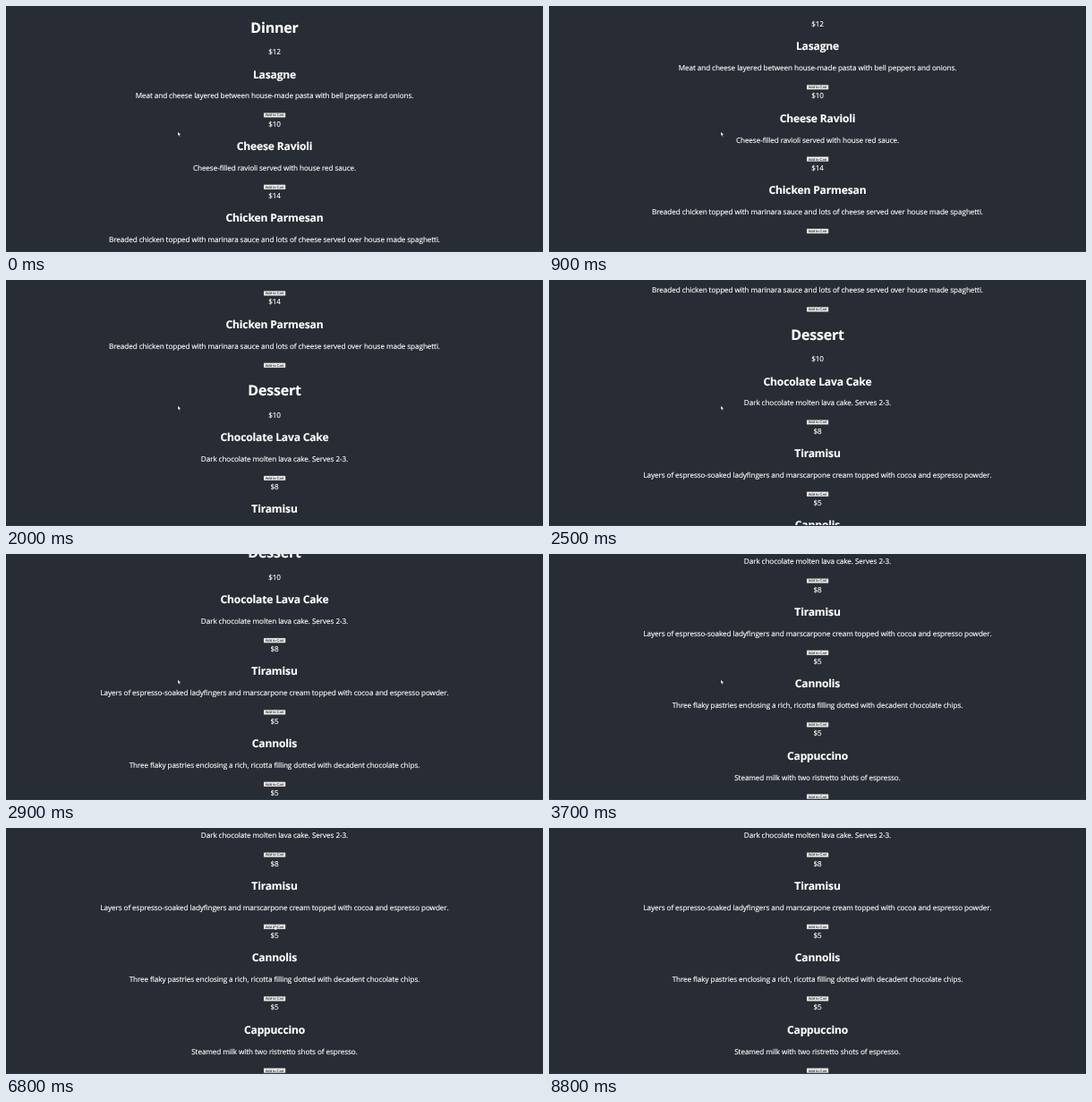
These frames come from a looping animation (600 by 275 pixels, 8.9 s). An HTML page:

```html
<!DOCTYPE html>
<html lang="en">
<head>
<meta charset="utf-8">
<title>Menu</title>
<style>
  html, body { margin: 0; width: 100%; height: 100%; overflow: hidden; background: #282c34; }
  svg { display: block; width: 100%; height: 100%; }
  text {
    fill: #fff; stroke: #fff; stroke-width: .14;
    text-anchor: middle; text-rendering: geometricPrecision;
    font: 8.2px "Open Sans", "Noto Sans", sans-serif; letter-spacing: -.1px;
  }
  .title { font-size: 16px; font-weight: 700; letter-spacing: -.2px; }
  .dish { font-size: 12.1px; font-weight: 700; letter-spacing: -.18px; }
  .label { font: 4.1px "Liberation Sans", Arial, sans-serif; fill: #000; stroke: none; letter-spacing: 0; }
  .button { fill: #efefef; stroke: #767676; stroke-width: .3; }
  .pointer { fill: #fff; stroke: #111; stroke-width: .35; stroke-linejoin: round; }
</style>
</head>
<body>
<svg viewBox="0 0 600 275">
  <g id="page"></g>
  <rect y="274" width="600" height="1" fill="#2a384a"/>
  <path id="arrow" class="pointer" d="M0 0V4.8L1.1 3.8L1.9 5.5L2.7 5.1L2 3.5H3.4Z"/>
  <path id="hand" class="pointer" d="M-.4 .4Q0 -.3 .5 .4V2.2L2.6 2.7V4.4L2 5.8H-.4L-1.8 3.4L-1.3 2.9L-.4 3.6Z"/>
</svg>
<script>
const LOOP = 8900, STEP = 100;
const SECTION_HEIGHT = 287, ITEM_HEIGHT = 80.4;
const WHEEL = { start: 675, interval: 231, ease: 150, distance: 31.25, end: 379 };

const menu = [
  ["Dinner", [
    ["$12", "Lasagne", "Meat and cheese layered between house-made pasta with bell peppers and onions."],
    ["$10", "Cheese Ravioli", "Cheese-filled ravioli served with house red sauce."],
    ["$14", "Chicken Parmesan", "Breaded chicken topped with marinara sauce and lots of cheese served over house made spaghetti."],
  ]],
  ["Dessert", [
    ["$10", "Chocolate Lava Cake", "Dark chocolate molten lava cake. Serves 2-3."],
    ["$8", "Tiramisu", "Layers of espresso-soaked ladyfingers and marscarpone cream topped with cocoa and espresso powder."],
    ["$5", "Cannolis", "Three flaky pastries enclosing a rich, ricotta filling dotted with decadent chocolate chips."],
    ["$5", "Cappuccino", "Steamed milk with two ristretto shots of espresso."],
  ]],
];

const line = (y, text, kind = "") => `<text x="300" y="${y}" class="${kind}">${text}</text>`;

const item = ([price, name, description], i) => `
  <g transform="translate(0 ${i * ITEM_HEIGHT})">
    ${line(54.2, price)}${line(80.5, name, "dish")}${line(103.4, description)}
    <rect class="button" x="288" y="119.4" width="24.2" height="5.2" rx=".3"/>
    ${line(123.4, "Add to Cart", "label")}
  </g>`;

const page = document.getElementById("page");
const arrow = document.getElementById("arrow");
const hand = document.getElementById("hand");

page.innerHTML = menu.map(([title, items], i) => `
  <g transform="translate(0 ${i * SECTION_HEIGHT})">
    ${line(29.8, title, "title")}${items.map(item).join("")}
  </g>`).join("");

const progress = (t, from, to) => Math.min(1, Math.max(0, (t - from) / (to - from)));
const smooth = p => p * p * (3 - 2 * p);
const mix = (a, b, p) => a + (b - a) * p;

function scrollAt(t) {
  let y = 0;
  for (let i = 0; i < 13; i++) {
    const from = WHEEL.start + i * WHEEL.interval;
    y += WHEEL.distance * smooth(progress(t, from, from + WHEEL.ease));
  }
  return Math.min(y, WHEEL.end);
}

function pointerAt(t) {
  const reach = smooth(progress(t, 3800, 4500));
  const leave = smooth(progress(t, 7300, 8000));
  return [mix(192, 300.5, reach), mix(mix(140.4, 108, reach), -10, leave)];
}

function draw(now) {
  const t = Math.floor(now % LOOP / STEP) * STEP;
  const [x, y] = pointerAt(t);
  const overButton = x > 288 && y > 107 && y < 113;
  page.setAttribute("transform", `translate(0 ${-scrollAt(t)})`);
  for (const [shape, shown] of [[arrow, !overButton], [hand, overButton]]) {
    shape.setAttribute("transform", `translate(${x} ${y})`);
    shape.setAttribute("visibility", shown ? "visible" : "hidden");
  }
}

const start = performance.now();
function tick() {
  draw(performance.now() - start);
  requestAnimationFrame(tick);
}
tick();
</script>
</body>
</html>
```
